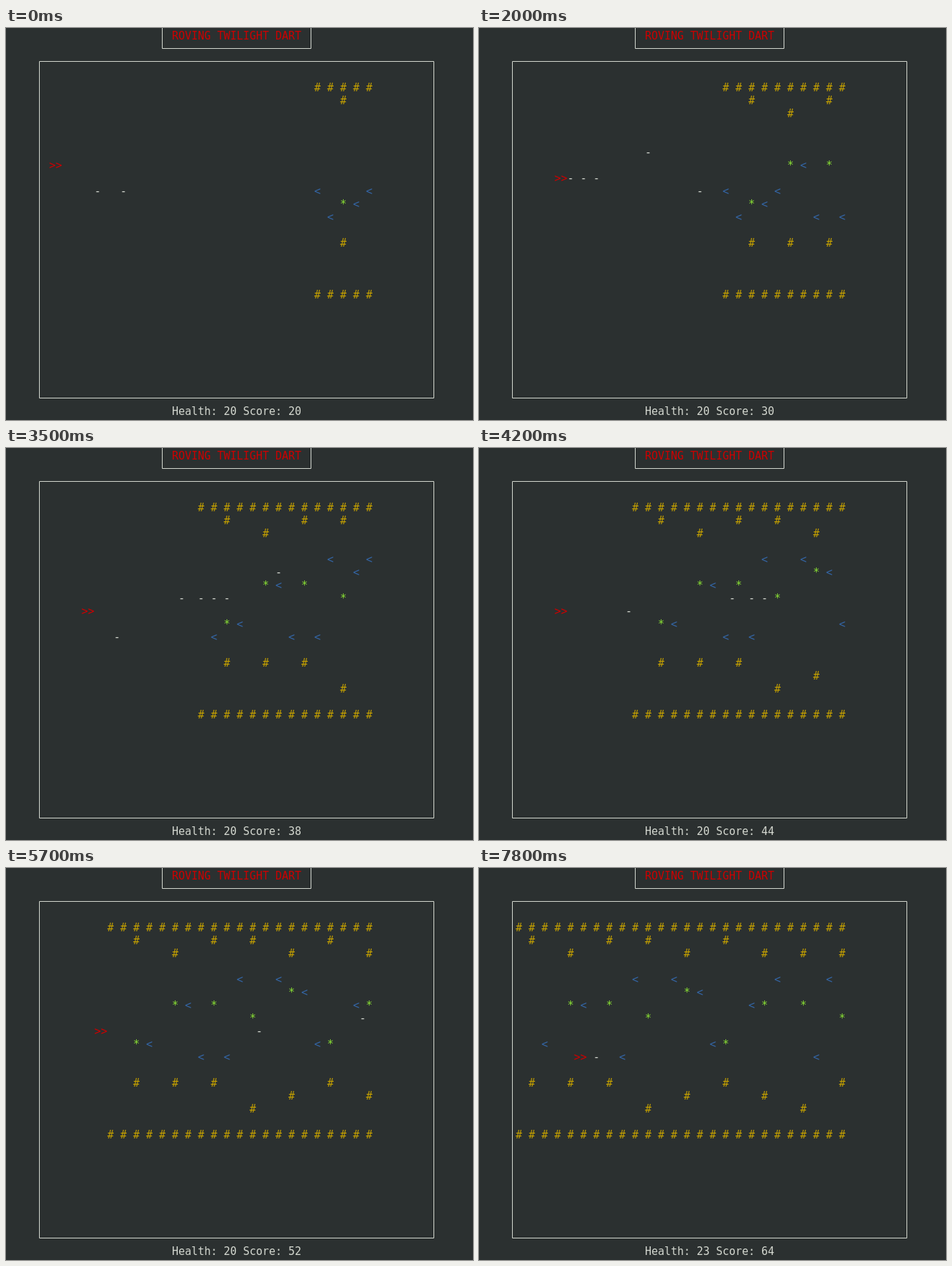
These frames come from a looping animation (650x545 px, 8 s). An HTML page:

```html
<!DOCTYPE html>
<html lang="en">
<head>
<meta charset="utf-8">
<title>Terminal shooter</title>
<style>
  html, body { margin: 0; width: 100%; height: 100%; overflow: hidden; background: #2b3030; }
  svg { display: block; }
  text {
    font: 15px "DejaVu Sans Mono", monospace;
    letter-spacing: -0.03px;
    white-space: pre;
    fill: #d3d7cf;
  }
  path { fill: none; stroke: #d3d7cf; }
  .red { fill: #cc0000; }
  .wall { fill: #c4a000; }
  .foe { fill: #3465a4; }
  .star { fill: #8ae234; }
</style>
</head>
<body>
<svg width="650" height="545" viewBox="0 0 650 545">
  <path d="M217.5 0V28.5H424.5V0M46.5 46.5H595.5V514.5H46.5Z"/>
  <text class="red" x="231" y="16">ROVING TWILIGHT DART</text>
  <g id="field"></g>
  <text id="status" x="231" y="538"></text>
</svg>
<script>
const LOOP = 8000, BEAT = 357, LEFT = 5, RIGHT = 55, GROUPS = 9;
const field = document.getElementById('field');
const status = document.getElementById('status');

// Key points: scroll steps over beats, then the ship's cell over scroll steps.
const scroll = [[0, 0], [7, 14], [8, 15], [10, 18], [11, 22], [22, 44]];
const shipCols = [[4, 6], [7, 10], [9, 10], [10, 11], [28, 11], [36, 14]];
const shipRows = [[-3, 12], [1, 9], [7, 11], [11, 11], [15, 14], [16, 14], [18, 12], [32, 12], [38, 14]];
const fireSteps = [-5, -3, 1, 7, 8, 9, 11, 16, 19, 39, 43];
const foeRows = [12, 14, 13, 12, 10, 14, 14, 8, 9, 8, 9, 13, 11, 10, 8, 12, 14, 8];
const starRows = [13, 10, 10, 11, 9];

// Linear path through key points, rounded to whole cells.
function along(points, t) {
  const i = points.findIndex(p => p[0] > t);
  if (i === 0) return points[0][1];
  if (i < 0) return points[points.length - 1][1];
  const [t0, a] = points[i - 1], [t1, b] = points[i];
  return Math.round(a + (b - a) * (t - t0) / (t1 - t0));
}

// The world moves one column left per step; a group is two foes, then two spikes and a star.
const foes = foeRows.map((row, i) => ({ row, col: 47 + 6 * (i >> 1) + 2 * (i % 2) }));
const groups = Array.from({ length: GROUPS }, (_, i) => {
  const bend = Math.abs(i - 5);
  return {
    col: 51 + 6 * i,
    top: i % 3 === 1 || i > 5 ? 6 : 5,
    star: starRows[i % 5],
    bottom: 16 + (bend < 3 ? bend : 0)
  };
});

// Shots move two columns right per step and take the first foe met inside the field.
const shots = fireSteps.map(fired => {
  const row = along(shipRows, fired);
  const col = along(shipCols, fired) + 1 - 2 * fired;
  const foe = foes.find(f => {
    const meet = (f.col - col) / 3;
    return f.row === row && !f.hit && meet > fired && f.col - meet <= RIGHT;
  });
  const end = foe ? (foe.col - col) / 3 : Infinity;
  if (foe) foe.hit = end;
  return { row, col, fired, end };
});

// A star is collected when the ship flies over it.
for (const g of groups) {
  for (let s = 0; s <= 44 && !g.taken; s++) {
    const gap = g.col - s - along(shipCols, s);
    if (along(shipRows, s) === g.star && (gap === 0 || gap === 1)) g.taken = s;
  }
}

function draw(step) {
  const cells = new Map();
  const put = (col, row, glyph, cls) => {
    if (col >= LEFT && col <= RIGHT) cells.set(col + ',' + row, { col, row, glyph, cls });
  };
  let health = 20;

  for (const s of shots) {
    if (step > s.fired && step <= s.end) put(s.col + 2 * step, s.row, '-', 'shot');
  }
  for (let col = 47 - step; col <= RIGHT; col += 2) {
    put(col, 4, '#', 'wall');
    put(col, 20, '#', 'wall');
  }
  for (const g of groups) {
    const col = g.col - step;
    put(col, g.top, '#', 'wall');
    put(col, g.bottom, '#', 'wall');
    if (g.taken <= step) health += 3;
    else put(col, g.star, '*', 'star');
  }
  for (const f of foes) {
    if (!(f.hit < step)) put(f.col - step, f.row, '&lt;', 'foe');
  }
  put(along(shipCols, step), along(shipRows, step), '&gt;&gt;', 'red');

  field.innerHTML = [...cells.values()].map(c =>
    `<text class="${c.cls}" x="${6 + 9 * c.col}" y="${16 + 18 * c.row}">${c.glyph}</text>`
  ).join('');
  status.textContent = `Health: ${health} Score: ${20 + step}`;
}

// Time runs in tenths of a second; one beat in fourteen is not shown.
function stepAt(ms) {
  const beat = Math.floor((Math.floor(ms / 100) * 100 + 99) / BEAT);
  return along(scroll, beat % 14 === 3 ? beat - 1 : beat);
}

let shown = -1;
function frame() {
  const step = stepAt(performance.now() % LOOP);
  if (step !== shown) draw(shown = step);
  requestAnimationFrame(frame);
}
frame();
</script>
</body>
</html>
```
